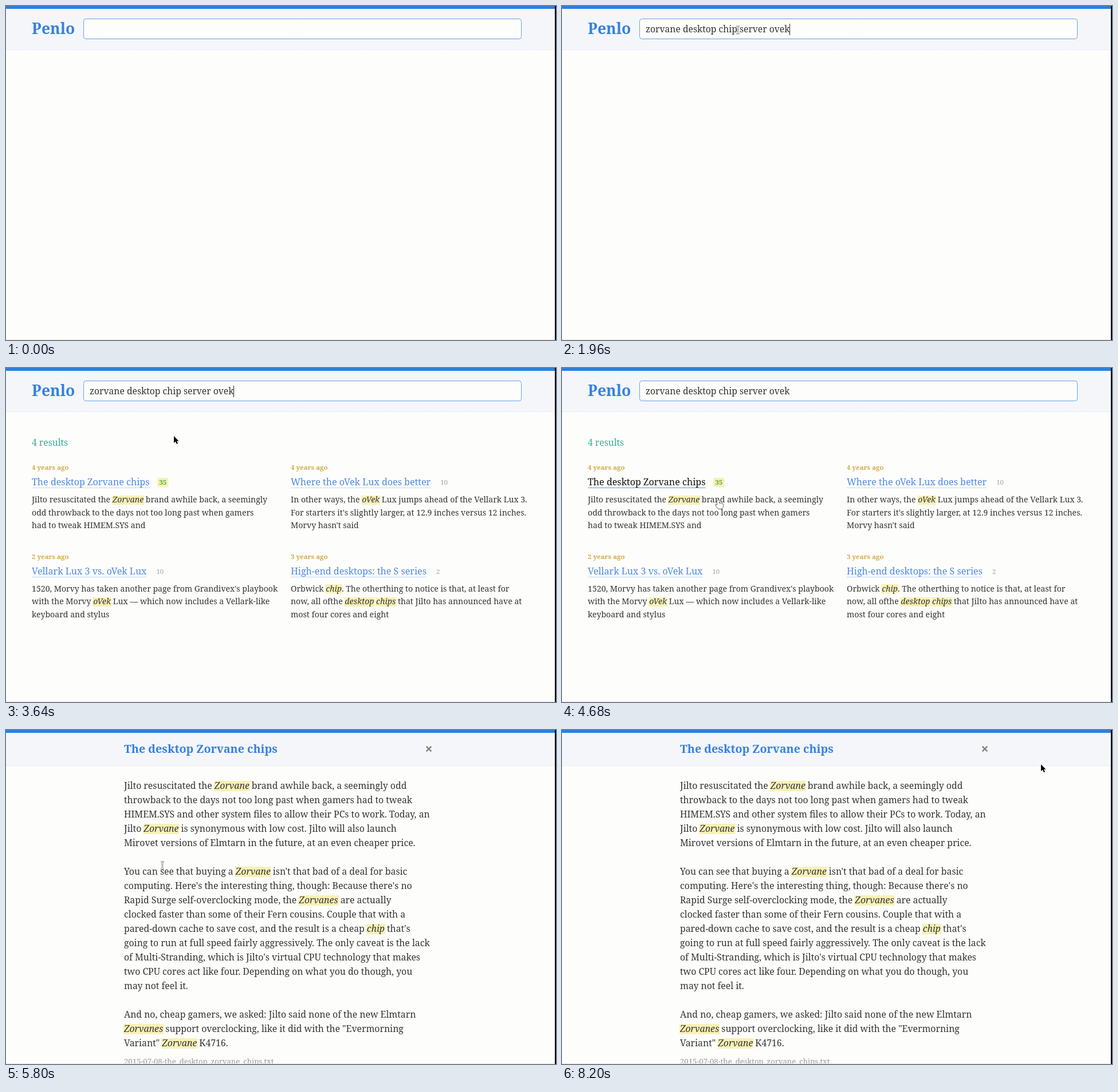
An HTML page with a canvas that plays this animation: 960 px wide and 584 px high, repeating every 8.28 s.

```html
<!DOCTYPE html>
<html lang="en">
<head>
<meta charset="utf-8">
<title>Note search</title>
<style>
html, body { margin: 0; width: 100%; height: 100%; overflow: hidden; background: #fdfdfb; }
canvas { display: block; }
</style>
</head>
<body>
<canvas id="stage" width="960" height="584"></canvas>
<script>
const ctx = document.getElementById('stage').getContext('2d');
const WIDTH = 960, HEIGHT = 584, LOOP = 8280;
const FAMILY = '"Noto Serif", serif';
const PAPER = '#fdfdfb', HEADER = '#f4f6fa', BLUE = '#3580e0', LINK = '#4d88e2';
const INK = '#333333', MARK = '#f8f1b6';

const QUERY = 'zorvane desktop chip server ovek';

// Asterisks enclose highlighted terms.
const cards = [
  { x: 45, y: 178, age: '4 years ago', title: 'The desktop Zorvane chips', score: '35', best: true, lines: [
    'Jilto resuscitated the *Zorvane* brand awhile back, a seemingly',
    'odd throwback to the days not too long past when gamers',
    'had to tweak HIMEM.SYS and'] },
  { x: 497, y: 178, age: '4 years ago', title: 'Where the oVek Lux does better', score: '10', lines: [
    'In other ways, the *oVek* Lux jumps ahead of the Vellark Lux 3.',
    "For starters it's slightly larger, at 12.9 inches versus 12 inches.",
    "Morvy hasn't said"] },
  { x: 45, y: 333.5, age: '2 years ago', title: 'Vellark Lux 3 vs. oVek Lux', score: '10', lines: [
    "1520, Morvy has taken another page from Grandivex's playbook",
    'with the Morvy *oVek* Lux — which now includes a Vellark-like',
    'keyboard and stylus'] },
  { x: 497, y: 333.5, age: '3 years ago', title: 'High-end desktops: the S series', score: '2', lines: [
    'Orbwick *chip*. The otherthing to notice is that, at least for',
    'now, all ofthe *desktop* *chips* that Jilto has announced have at',
    'most four cores and eight'] }
];

const article = [
  'Jilto resuscitated the *Zorvane* brand awhile back, a seemingly odd',
  'throwback to the days not too long past when gamers had to tweak',
  'HIMEM.SYS and other system files to allow their PCs to work. Today, an',
  'Jilto *Zorvane* is synonymous with low cost. Jilto will also launch',
  'Mirovet versions of Elmtarn in the future, at an even cheaper price.',
  '',
  "You can see that buying a *Zorvane* isn't that bad of a deal for basic",
  "computing. Here's the interesting thing, though: Because there's no",
  'Rapid Surge self-overclocking mode, the *Zorvanes* are actually',
  'clocked faster than some of their Fern cousins. Couple that with a',
  "pared-down cache to save cost, and the result is a cheap *chip* that's",
  'going to run at full speed fairly aggressively. The only caveat is the lack',
  "of Multi-Stranding, which is Jilto's virtual CPU technology that makes",
  'two CPU cores act like four. Depending on what you do though, you',
  'may not feel it.',
  '',
  'And no, cheap gamers, we asked: Jilto said none of the new Elmtarn',
  '*Zorvanes* support overclocking, like it did with the "Evermorning',
  'Variant" *Zorvane* K4716.'
];

const clamp = v => Math.max(0, Math.min(1, v));
const progress = (t, from, to) => clamp((t - from) / (to - from));
const smooth = p => p * p * (3 - 2 * p);

function rect(x, y, w, h, color) {
  ctx.fillStyle = color;
  ctx.fillRect(x, y, w, h);
}

// Draws text and returns the x where it ends.
function text(str, x, y, size, color, style = '') {
  ctx.font = `${style} ${size}px ${FAMILY}`;
  ctx.fillStyle = color;
  ctx.fillText(str, x, y);
  return x + ctx.measureText(str).width;
}

function markedLine(line, x, y, size) {
  line.split('*').forEach((part, i) => {
    if (i % 2) {
      ctx.font = `italic ${size}px ${FAMILY}`;
      const width = ctx.measureText(part).width;
      rect(x - 1, Math.round(y - size * 0.87), width + 2, Math.round(size * 1.13), MARK);
      x = text(part, x, y, size, INK, 'italic');
    } else {
      x = text(part, x, y, size, INK);
    }
  });
}

function dashedLine(x1, x2, y, color, dash) {
  ctx.strokeStyle = color;
  ctx.lineWidth = 1;
  ctx.setLineDash(dash);
  ctx.beginPath();
  ctx.moveTo(x1, y);
  ctx.lineTo(x2, y);
  ctx.stroke();
  ctx.setLineDash([]);
}

function page(headerBottom) {
  rect(0, 0, WIDTH, HEIGHT, PAPER);
  rect(0, 0, WIDTH, headerBottom, HEADER);
  dashedLine(0, 958, headerBottom + 0.5, '#e2e5f2', [3, 2]);
  rect(0, 0, WIDTH, 5, '#2880df');
}

function searchBar(t) {
  text('Penlo', 45, 49, 26.5, BLUE, 'bold');
  ctx.beginPath();
  ctx.roundRect(135.5, 22.5, 764, 35, 4);
  ctx.fillStyle = PAPER;
  ctx.fill();
  ctx.strokeStyle = '#6a9ee8';
  ctx.lineWidth = 1;
  ctx.stroke();
  const end = t >= 1960 ? text(QUERY, 146, 46, 15.7, INK) : 146;
  const caretOn = t >= 1400 && t < 2520 || t >= 3160 && t < 3760 || t >= 4360 && t < 4520;
  if (caretOn) rect(Math.round(end), 31, 1, 20, '#222');
}

function card({ x, y, age, title, score, best, lines }, hovered) {
  text(age, x, y, 11.5, '#d0aa45', 'bold');
  const end = text(title, x, y + 27, 16.1, hovered ? '#111' : LINK);
  dashedLine(x, end, Math.round(y + 31) + 0.5, hovered ? '#6c96d8' : '#a9c7f1', hovered ? [] : [2, 1]);
  if (best) rect(end + 14, y + 14, 19, 16, MARK);
  text(score, end + 17, y + 26, 11.5, best ? '#5aa33c' : '#a5a5a5', best ? 'bold' : '');
  lines.forEach((line, i) => markedLine(line, x, y + 57 + i * 22.5, 14.1));
}

function results(t) {
  text('4 results', 45, 136, 15.7, '#2fb095');
  cards.forEach((item, i) => card(item, i === 0 && t >= 3800));
}

function articlePage() {
  page(62);
  text('The desktop Zorvane chips', 206, 40, 19.7, BLUE, 'bold');
  ctx.strokeStyle = '#85857f';
  ctx.lineWidth = 2.6;
  ctx.beginPath();
  for (const s of [-1, 1]) {
    ctx.moveTo(738 - 4.3, 33 - 4.3 * s);
    ctx.lineTo(738 + 4.3, 33 + 4.3 * s);
  }
  ctx.stroke();
  article.forEach((line, i) => markedLine(line, 206, 102.5 + i * 25, 15.8));
  text('2015-07-08-the_desktop_zorvane_chips.txt', 206, 584, 13.1, '#999');
}

function shape(path, fill, stroke, width) {
  const outline = new Path2D(path);
  ctx.lineWidth = width;
  ctx.strokeStyle = stroke;
  ctx.stroke(outline);
  ctx.fillStyle = fill;
  ctx.fill(outline);
}

const pointers = {
  arrow() {
    shape('M0 0V12L3 9.5L5 14L7 13L5 8.8H8.5Z', '#000', '#fff', 2);
  },
  hand() {
    shape('M-2 1Q0-1.5 1 1V6Q2.5 4.5 3.5 6Q5 5 6 6.5Q8 6 8 8V11Q8 13 6 15H0L-5 9Q-5 7-2 9Z',
      '#fff', '#666', 1.8);
  },
  beam() {
    ctx.beginPath();
    ctx.moveTo(-3, -6.5);
    ctx.quadraticCurveTo(0, -6.5, 0, -4);
    ctx.quadraticCurveTo(0, -6.5, 3, -6.5);
    ctx.moveTo(0, -4);
    ctx.lineTo(0, 4);
    ctx.moveTo(-3, 6.5);
    ctx.quadraticCurveTo(0, 6.5, 0, 4);
    ctx.quadraticCurveTo(0, 6.5, 3, 6.5);
    for (const [width, color] of [[2.6, '#777'], [1, '#fff']]) {
      ctx.lineWidth = width;
      ctx.strokeStyle = color;
      ctx.stroke();
    }
  }
};

const moves = [
  { from: 520, to: 1280, start: [520, 335], end: [312, 46] },
  { from: 1400, to: 1440, start: [312, 46], end: [307, 42] },
  { from: 3360, to: 4000, start: [307, 42], end: [273, 231] },
  { from: 5800, to: 6240, start: [273, 237], end: [827, -3] },
  { from: 8120, to: 8200, start: [827, -3], end: [836, 60] }
];

function pointer(t) {
  const move = moves.filter(m => t >= m.from).pop();
  if (!move) return;
  const p = smooth(progress(t, move.from, move.to));
  const [x, y] = move.start.map((v, i) => v + (move.end[i] - v) * p);
  let kind = 'arrow';
  if (t < 4960) {
    if (y < 58) kind = 'beam';
    else if (t > 3400 && y > 160) kind = 'hand';
  } else if (x < 740 && y > 85) {
    kind = 'beam';
  }
  ctx.save();
  ctx.translate(Math.round(x), Math.round(y));
  ctx.lineJoin = 'round';
  pointers[kind]();
  ctx.restore();
}

function draw(t) {
  const opened = t < 4760 ? 0 : progress(t, 4720, 4900);
  if (opened < 1) {
    page(76);
    searchBar(t);
    ctx.globalAlpha = progress(t, 2480, 2700);
    if (ctx.globalAlpha > 0) results(t);
  }
  ctx.globalAlpha = opened;
  if (opened > 0) articlePage();
  ctx.globalAlpha = 1;
  rect(0, 583, WIDTH, 1, '#e6e6e4');
  pointer(t);
  rect(958, 0, 2, HEIGHT, '#000');
}

const began = performance.now();
function tick() {
  draw((performance.now() - began) % LOOP);
  requestAnimationFrame(tick);
}
tick();
</script>
</body>
</html>
```
